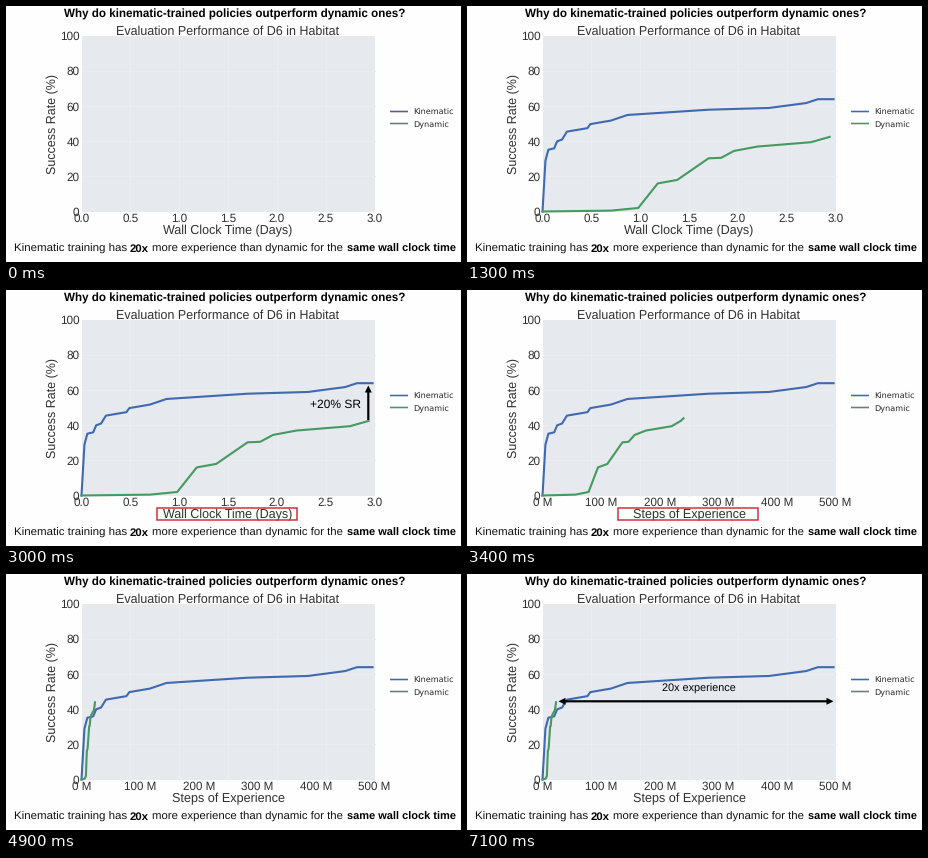
Recreate the animation shown at these times as a matplotlib script. Size 455 px wide and 256 px high, loop 7300 ms.

```python
import matplotlib as mpl
import matplotlib.pyplot as plt
import numpy as np
from matplotlib.animation import FuncAnimation
from matplotlib.patches import Polygon, Rectangle

W, H, DPI = 455, 256, 100
FRAMES, STEP = 73, 100
PX = 72 / DPI
LEFT, RIGHT, TOP, BOTTOM = 75.5, 368.5, 30, 205.5
BLUE, GREEN, RED, INK = "#4169b0", "#469a60", "#cf2f3c", "#303030"
DULL_BLUE, DULL_GREEN = "#585d82", "#6a8073"
FACE, GRID = "#e6eaee", "#ebeef1"

# Key points: days, success rate in percent
KINEMATIC = np.array([
    (0, 0), (.03, 29), (.06, 35.2), (.12, 36), (.15, 40), (.2, 41),
    (.25, 45.5), (.46, 47.5), (.49, 49.8), (.7, 51.8), (.87, 55),
    (1.7, 58), (2.32, 59), (2.7, 61.8), (2.82, 64), (2.98, 64)])
DYNAMIC = np.array([
    (0, 0), (.7, .5), (.98, 2), (1.18, 16), (1.38, 18), (1.7, 30.3),
    (1.83, 30.6), (1.96, 34.5), (2.2, 37), (2.75, 39.5), (2.94, 42.5),
    (3, 44)])

mpl.rcParams.update({"toolbar": "None", "text.hinting": "none"})
fig = plt.figure(figsize=(W / DPI, H / DPI), dpi=DPI, facecolor="#fefefe")
ax = fig.add_axes([0, 0, 1, 1])
ax.set_xlim(0, W)
ax.set_ylim(H, 0)
ax.axis("off")


def label(x, y, text, size, ha="center", color=INK, font="Liberation Sans", **kw):
    return ax.text(x, y, text, fontsize=size * PX, ha=ha, va="baseline",
                   color=color, family=font, **kw)


def stroke(xs, ys, color, width, **kw):
    return ax.plot(xs, ys, color=color, lw=width * PX, **kw)[0]


def arrow(start, end, heads=1, width=2.2, size=7):
    """Solid arrow with one or two heads."""
    start, end = np.array(start, float), np.array(end, float)
    along = (end - start) / np.hypot(*(end - start))
    side = np.array([-along[1], along[0]])
    neck = end - size * along
    half = [neck + side * width / 2, neck + side * size / 2, end]
    tail = start + along * (size if heads == 2 else 0)
    base = [tail + side * width / 2]
    if heads == 2:
        base = [start, tail + side * size / 2] + base
    upper = base + half
    mirror = [p - 2 * np.dot(p - start, side) * side for p in upper[::-1]]
    return Polygon(upper + mirror, fc="black", lw=0, zorder=4)


def ramp(i, start, length):
    return float(np.clip((i - start) / length, 0, 1))


def place(curve, until, squeeze=1):
    """Stage coordinates of a curve up to a day, its width scaled."""
    days, rate = curve.T
    stop = min(until, days[-1])
    keep = days < stop
    xs = np.append(days[keep], stop) / 3 * squeeze
    ys = np.append(rate[keep], np.interp(stop, days, rate)) / 100
    return LEFT + (RIGHT - LEFT) * xs, BOTTOM - (BOTTOM - TOP) * ys


# Headline and caption
label(228.5, 12, "Why do kinematic-trained policies outperform dynamic ones?",
      11.6, color="black", weight="bold")
label(8, 246, "Kinematic training has", 11.45, "left", "#111111")
label(124, 246, "20x", 11.4, "left", "black", weight="bold")
label(146, 246, "more experience than dynamic for the", 11.4, "left", "#111111")
label(450, 246, "same wall clock time", 11.05, "right", "black", weight="bold")

# Chart frame
plot_area = Rectangle((LEFT, TOP), RIGHT - LEFT, BOTTOM - TOP, fc=FACE, ec="none")
ax.add_patch(plot_area)
day_x = np.linspace(LEFT, RIGHT, 7)
for x in day_x[1:-1]:
    stroke([x, x], [TOP, BOTTOM], GRID, 1)
for k, y in enumerate(np.linspace(BOTTOM, TOP, 6)):
    if 0 < k < 5:
        stroke([LEFT, RIGHT], [y, y], GRID, 1)
    label(73.3, y + 4.2, str(20 * k), 11.7, "right")
label(222, 28.7, "Evaluation Performance of D6 in Habitat", 12.55)
label(50.7, 118, "Success Rate (%)", 12.5, rotation=90, rotation_mode="anchor")

day_axis = [label(x, 215.5, f"{k / 2:.1f}", 11.6) for k, x in enumerate(day_x)]
day_axis.append(label(222, 228, "Wall Clock Time (Days)", 12.5))
step_axis = [label(x, 215.5, f"{100 * k} M", 11.6)
             for k, x in enumerate(np.linspace(LEFT, RIGHT, 6))]
step_axis.append(label(222, 228, "Steps of Experience", 12.6))

# Curves and legend
kin_line = stroke([], [], BLUE, 2.1, solid_joinstyle="round", clip_path=plot_area)
dyn_line = stroke([], [], GREEN, 2.1, solid_joinstyle="round", clip_path=plot_area)
keys = []
for y, name in ((105.5, "Kinematic"), (117.5, "Dynamic")):
    keys.append(stroke([384, 402], [y, y], BLUE, 1.6,
                       solid_capstyle="butt", snap=False))
    label(406.8, y + 2.5, name, 8.1, "left", "#262626", "DejaVu Sans")

# Annotations
frame_box = Rectangle((151, 217.5), 139.5, 12.5, fill=False, ec=RED,
                      lw=1.5 * PX, zorder=4)
gain = [arrow((362.3, 130), (362.3, 95.5)),
        label(329.5, 118.3, "+20% SR", 12, color="black")]
ratio = [arrow((91.5, 127.3), (366.5, 127.3), heads=2),
         label(232, 117.5, "20x experience", 10.9, color="black")]
for patch in (frame_box, gain[0], ratio[0]):
    ax.add_patch(patch)


def update(i):
    by_steps = i >= 31
    reveal = 3 * ramp(i, 0, 12)
    # Dynamic curve shrinks to about a twentieth of its width
    squeeze = 1 - 0.954 * (1 - (1 - ramp(i, 31, 10)) ** 2.2)
    kin_line.set_data(*place(KINEMATIC, reveal))
    dyn_line.set_data(*place(DYNAMIC, reveal if by_steps else min(reveal, 2.94),
                             squeeze))
    for line in (kin_line, dyn_line):
        line.set_visible(i > 0)
    keys[0].set_color(BLUE if i else DULL_BLUE)
    keys[1].set_color(GREEN if i and not by_steps else DULL_GREEN)

    for t in day_axis:
        t.set_visible(not by_steps)
    for t in step_axis:
        t.set_visible(by_steps)
    for a in gain:
        a.set_alpha(0 if by_steps else ramp(i, 13, 3))
    for a in ratio:
        a.set_alpha(ramp(i, 56, 4))
    frame_box.set_alpha(ramp(i, 16, 6) - ramp(i, 43, 6))
    return []


anim = FuncAnimation(fig, update, frames=FRAMES, interval=STEP,
                     init_func=lambda: update(0), repeat=True, repeat_delay=0)
plt.show()
```
